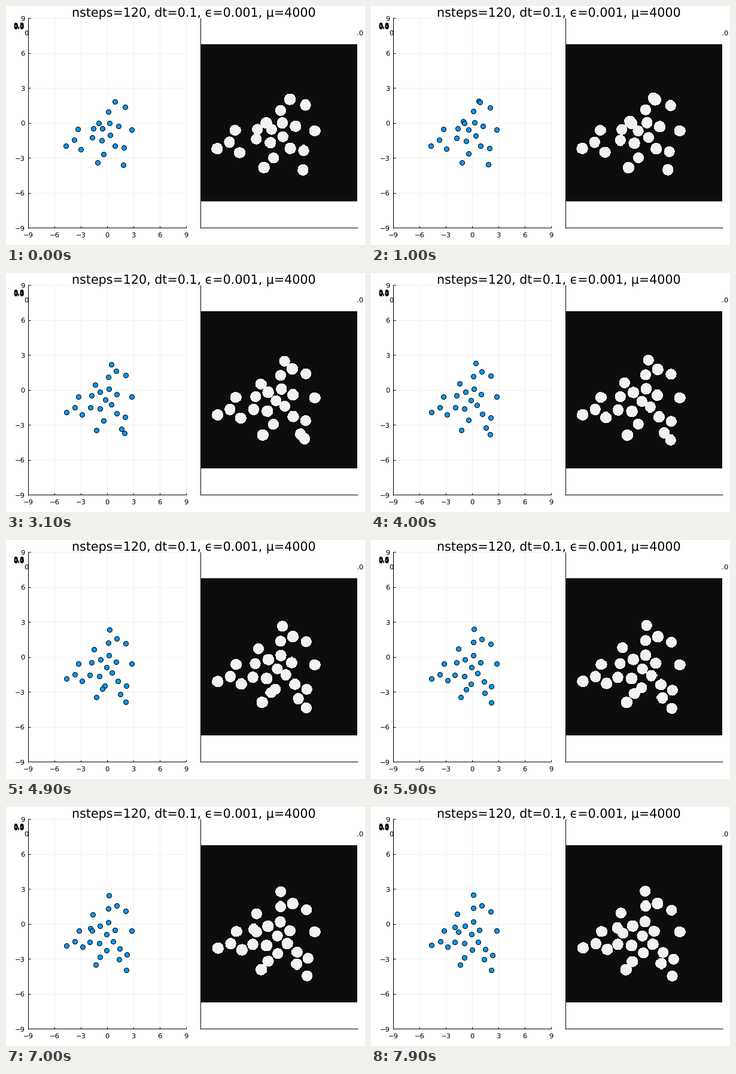
Animation, 600 px wide and 400 px high, one loop 8 s. Source, as a matplotlib script:

```python
import matplotlib.pyplot as plt
import numpy as np
from matplotlib.animation import FuncAnimation
from matplotlib.patches import Rectangle

W, H, DPI = 600, 400, 100
FRAMES, STEP_MS = 80, 100
LOOP = FRAMES * STEP_MS / 1000
PX = 72 / DPI                       # one pixel in points

# Pixel geometry of the two panels
L, R, T, B = 37.2, 301.2, 20.2, 371.2
IMG_L, IMG_R, IMG_T, IMG_B = 325, 587, 64.5, 327
GRID, RADIUS = 256, 9.3
DARK, LIGHT = 13, 242

# Founder cells in right-panel pixels: x, y and total shift dx, dy
drifting = np.array([
    (475, 156.5, -6, -5),
    (435.5, 196, -7.5, -7.5),
    (496.8, 274.5, -2, -2),
    (447.5, 254.5, -1, -3),
    (501, 166, 2, 7),
    (459.5, 175, 0, -9),
    (462.5, 196, -4, -4),
    (484.5, 201.5, -11, 6.5),
    (516.5, 209, 0, 0),
    (383.5, 208, 2.5, 0.5),
    (463.5, 219, 8, 11),
    (374, 228, 2.5, 1),
    (353.5, 239, 1.5, -3),
    (391, 245.5, 4.5, -7),
    (475.5, 238.5, 13, 5),
    (498, 242, 8.5, 13),
    (431.5, 270.5, -5, 2),
])
# Crowded cells come to rest at SETTLE seconds
settling = np.array([
    (421, 206.5, -4, 0.5),
    (444, 206.5, 10, 9.5),
    (419, 223, -6, 7),
    (442.5, 229, -6.5, 3),
])
SETTLE = 5.5

# Divisions: mother, birth time, direction of the daughter in degrees
divisions = [(0, 1.0, 45), (1, 1.0, 48), (2, 2.3, 48), (3, 4.3, 141), (17, 6.7, 43)]


def cells_at(t):
    ease = np.sin(np.pi / 2 * min(1, t / SETTLE))
    cells = np.vstack([
        drifting[:, :2] + drifting[:, 2:] * t / LOOP,
        settling[:, :2] + settling[:, 2:] * ease,
    ])
    born = []
    for mother, birth, angle in divisions:
        age = t - birth
        if age < -1e-9:
            continue
        gap = 4 + 28 * (1 - np.exp(-age / 3))
        a = np.radians(angle)
        half = gap / 2 * np.array([np.cos(a), np.sin(a)])
        born.append(cells[mother] + half)
        cells[mother] -= half
    return np.vstack([cells, *born])


def to_scatter(p):
    """Right-panel pixels to left-panel pixels."""
    x = 169.5 + (p[:, 0] - 456.75) * 14.667 / 21.875
    y = 196 + (p[:, 1] - 196.4) * 19.5 / 21.875
    return x, y


mid = (np.arange(GRID) + 0.5) / GRID
gx = IMG_L + 0.5 + (IMG_R - IMG_L) * mid[None, :]
gy = IMG_T + (IMG_B - IMG_T) * mid[:, None]


def raster(p):
    inside = np.zeros((GRID, GRID), bool)
    for x, y in p:
        inside |= (gx - x) ** 2 + (gy - y) ** 2 <= RADIUS ** 2
    return np.where(inside, LIGHT, DARK)


plt.rcParams.update({"font.family": "DejaVu Sans", "text.hinting": "none"})
fig = plt.figure(figsize=(W / DPI, H / DPI), dpi=DPI, facecolor="white")
ax = fig.add_axes([0, 0, 1, 1])
ax.axis("off")


def line(x0, y0, x1, y1, color="black", z=4):
    ax.plot([x0, x1], [y0, y1], color=color, lw=PX, zorder=z,
            solid_capstyle="butt")


def label(x, y, text, ha="center", z=5):
    ax.text(x, y, text, size=11.5 * PX, ha=ha, va="baseline", zorder=z)


# Squeezed axis labels, partly hidden behind the panels
for i in range(6):
    label(31, 38.8 - 0.68 * i, f"{i / 5:.1f}", ha="right", z=0)
label(39.6, 49.3, "0.0", z=0)
label(589, 49.3, "1.0", z=0)
ax.add_patch(Rectangle((L, T), IMG_R - L, B - T, fc="white", ec="none", zorder=1))

# Left panel
for v in range(-9, 10, 3):
    x = L + (R - L) * (v + 9) / 18
    y = B - (B - T) * (v + 9) / 18
    line(x, T, x, B, "#f0f0f0", 2)
    line(L, y, R, y, "#f0f0f0", 2)
    line(x, B, x, B - 3.5)
    line(L, y, L + 3.5, y)
    text = str(v).replace("-", "\u2212")
    label(x, 387.2, text)
    label(31.3, y + 4.4, text, ha="right")
line(L, T, L, B + 0.5)
line(L, B, R, B)

# Right panel
line(IMG_L, T, IMG_L, B + 0.5)
line(IMG_L, B, IMG_R + 0.5, B)

ax.text(313.5, 18.5, "nsteps=120, dt=0.1, \u03f5=0.001, \u03bc=4000",
        size=14.9, ha="center", va="baseline", zorder=6)

image = ax.imshow(raster(cells_at(0)), cmap="gray", vmin=0, vmax=255,
                  extent=[IMG_L, IMG_R, IMG_B, IMG_T], aspect="auto",
                  interpolation="nearest", zorder=3)
dots, = ax.plot([], [], "o", ms=8 * PX, mfc="#009afa", mec="black",
                mew=PX, zorder=5, snap=False)
ax.set(xlim=(0, W), ylim=(H, 0))


def update(i):
    p = cells_at(i * STEP_MS / 1000)
    dots.set_data(*to_scatter(p))
    image.set_data(raster(p))
    return dots, image


anim = FuncAnimation(fig, update, frames=FRAMES, interval=STEP_MS,
                     repeat=True, repeat_delay=0)
plt.show()
```
